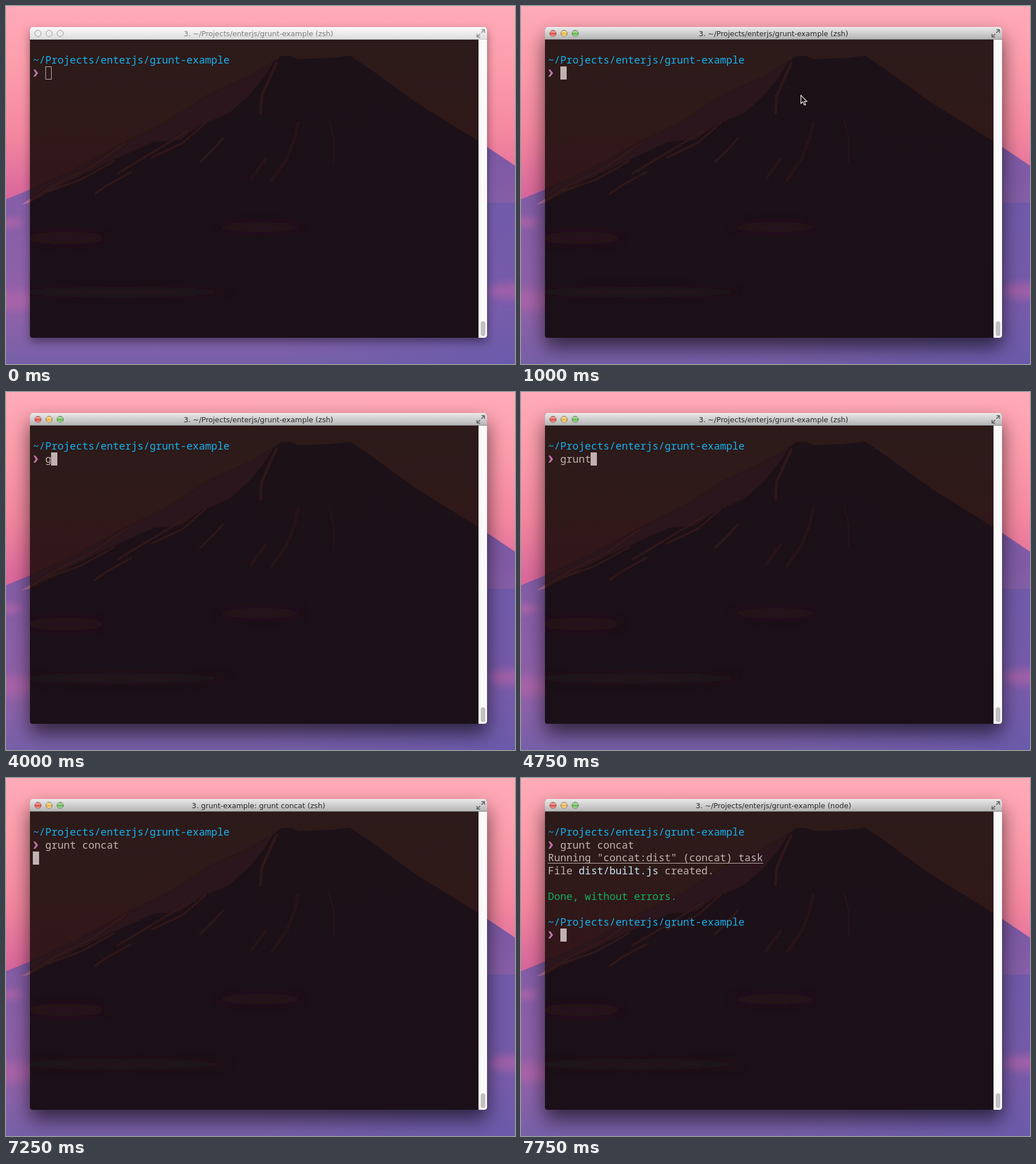
Animation, 892 px wide and 628 px high, one loop 8000 ms. Source, as an HTML page:

```html
<!DOCTYPE html>
<html lang="en">
<head>
<meta charset="utf-8">
<title>Terminal</title>
<style>
html, body { margin: 0; width: 100%; height: 100%; overflow: hidden; }
svg { display: block; width: 892px; height: 628px; }
.mono { font: 17.95px "Noto Sans Mono", monospace; fill: #c1b3b0; white-space: pre; }
#title { font: 12.68px "DejaVu Sans", sans-serif; text-anchor: middle; }
.path { fill: #14b2ee; }
.file { fill: #caeaf5; }
.ok { fill: #13ad5c; }
</style>
</head>
<body>
<svg viewBox="0 0 892 628">
  <defs>
    <linearGradient id="sky" x2="0" y2="1">
      <stop stop-color="#ffabb8"/><stop offset=".3" stop-color="#fd9dac"/>
      <stop offset=".65" stop-color="#f4879f"/><stop offset="1" stop-color="#d7649c"/>
    </linearGradient>
    <linearGradient id="hill" gradientUnits="userSpaceOnUse" x1="0" y1="240" x2="0" y2="628">
      <stop stop-color="#7b58a4"/><stop offset=".3" stop-color="#865fa7"/>
      <stop offset=".6" stop-color="#8d60a7"/><stop offset=".72" stop-color="#9563a9"/>
      <stop offset="1" stop-color="#7660a8"/>
    </linearGradient>
    <linearGradient id="blue"><stop offset=".5" stop-color="#5f56ac" stop-opacity="0"/><stop offset="1" stop-color="#5f56ac" stop-opacity=".55"/></linearGradient>
    <linearGradient id="dusk" x2="0" y2="1">
      <stop stop-color="#2c1b1a"/><stop offset=".5" stop-color="#2f1919"/><stop offset="1" stop-color="#33161a"/>
    </linearGradient>
    <linearGradient id="rock" x2="0" y2="1">
      <stop stop-color="#1d1118"/><stop offset="1" stop-color="#1b1018"/>
    </linearGradient>
    <linearGradient id="barOff" x2="0" y2="1"><stop stop-color="#fafafa"/><stop offset="1" stop-color="#dcdcdc"/></linearGradient>
    <linearGradient id="barOn" x2="0" y2="1"><stop stop-color="#e9e9e9"/><stop offset="1" stop-color="#b3b3b3"/></linearGradient>
    <linearGradient id="gloss" x2="0" y2="1"><stop stop-color="#fff" stop-opacity=".1"/><stop offset=".25" stop-color="#fff" stop-opacity=".55"/><stop offset=".5" stop-color="#fff" stop-opacity="0"/><stop offset="1" stop-color="#fff" stop-opacity=".5"/></linearGradient>
    <filter id="soft" x="-50%" y="-150%" width="200%" height="400%"><feGaussianBlur stdDeviation="7"/></filter>
    <filter id="fuzz"><feGaussianBlur stdDeviation="1.2"/></filter>
    <clipPath id="frame"><rect x="42" y="37" width="801" height="545" rx="4.5"/></clipPath>
  </defs>

  <!-- wallpaper -->
  <rect width="892" height="345" fill="url(#sky)"/>
  <path d="M0 339 42 322 470 96H603L828 237 892 280V628H0Z" fill="url(#hill)"/>
  <rect y="345" width="892" height="283" fill="url(#blue)"/>
  <path d="M28 348 42 338V345Z" fill="#c27aa9"/>
  <g filter="url(#soft)" fill="#b965a8">
    <ellipse cx="6" cy="380" rx="22" ry="6"/>
    <ellipse cx="8" cy="516" rx="45" ry="18" opacity=".5"/>
    <ellipse cx="884" cy="500" rx="38" ry="14" opacity=".6"/>
  </g>

  <!-- window -->
  <rect id="shadow" x="42" y="37" width="801" height="545" rx="4.5" fill="#1c1118"/>
  <g clip-path="url(#frame)">
    <rect x="42" y="59" width="786" height="270" fill="url(#dusk)"/>
    <path d="M42 322 120 287 200 243 285 201 360 153 425 124 470 97 482 88 498 87 512 93 570 91 603 87 640 112 720 170 828 237V582H42Z" fill="url(#rock)"/>
    <path d="M42 322 120 287 200 243 285 201 360 153 425 124 470 97 452 125 425 158 392 187 340 210 305 235 260 238 200 265 120 303 42 345Z" fill="#2b171a" filter="url(#fuzz)"/>
    <g fill="none" stroke="#361b1c" stroke-linecap="round" filter="url(#fuzz)">
      <path stroke-width="3" d="M42 342 85 314 150 282 210 240M75 325 130 305 190 272M155 330 178 314 220 291M195 294 265 252 320 218M255 266 310 240 350 205M340 274 368 246 380 232"/>
      <path stroke-width="5" d="M474 100 461 128 448 158 446 188" opacity=".75"/>
      <path stroke-width="6" d="M512 205 506 232 492 268 466 305M430 302 455 268" opacity=".45"/>
      <path stroke-width="2" d="M566 200 575 235 574 275" opacity=".6"/>
    </g>
    <g filter="url(#soft)" fill="#2c151b">
      <ellipse cx="105" cy="407" rx="70" ry="11" opacity=".75"/>
      <ellipse cx="445" cy="388" rx="75" ry="9" opacity=".6"/>
      <ellipse cx="200" cy="502" rx="190" ry="10" opacity=".3"/>
    </g>
    <rect x="828" y="59" width="15" height="523" fill="#fafafa"/>
    <path d="M828.5 59V582" stroke="#ebe8e8"/>
    <rect x="832" y="553" width="8" height="26" rx="4" fill="#c1c1c1"/>
    <rect id="bar" x="42" y="37" width="801" height="22"/>
    <path id="edge" d="M42 58.5H843"/>
    <path d="M44 37.5H841" stroke="#fff" opacity=".6"/>
  </g>
  <g id="lights"></g>
  <path id="full" d="M833 41.5H838.5V47M838 42 833 47M831 54.5H825.5V49M826 54 831 49" fill="none" stroke-width="1.7"/>
  <text id="title" x="442.5" y="53"></text>
  <g id="screen"></g>
  <rect id="caret"/>
  <path id="mouse" d="M0 0V14.5L3.3 11.5 5.8 17H8.3L6 11H10.6Z" fill="#111" stroke="#fff" stroke-width="1.1"/>
</svg>
<script>
const $ = id => document.getElementById(id);
const LOOP = 8000, COL = 10.77, LINE = 22.5, LEFT = 47.3, TOP = 83.5;
const CWD = '~/Projects/enterjs/grunt-example', CMD = 'grunt concat';

// [start time, value] lists, each value holding until the next
const typed = [[0, 0], [4000, 1], [4250, 2], [4500, 4], [4750, 5], [6000, 6], [6250, 9], [6500, 11], [6750, 12]];
const titles = [[0, CWD + ' (zsh)'], [7250, 'grunt-example: ' + CMD + ' (zsh)'], [7500, CWD + ' (zsh)'], [7750, CWD + ' (node)']];
const mouse = [[0, null], [500, [868, 50]], [750, [537.5, 141.5]], [1000, [490.5, 156.5]], [2250, [492.5, 156.5]], [2500, null]];
const at = (list, t) => list.findLast(([start]) => start <= t)[1];

const set = (id, attrs) => { for (const k in attrs) $(id).setAttribute(k, attrs[k]); };
const span = (cls, s) => `<tspan class="${cls}">${s}</tspan>`;
const line = (row, html, col = 0) =>
  `<text class="mono" x="${LEFT + col * COL}" y="${TOP + row * LINE + 17.8}">${html}</text>`;
const prompt = (row, input) => line(row, span('path', CWD)) +
  `<path d="M48 ${TOP + (row + 1) * LINE + 5.5}h3.4l4.8 6.3-4.8 6.3H48l4-6.3Z" fill="#bd75a6"/>` +
  line(row + 1, input, 2);
const output = line(2, 'Running "concat:dist" (concat) task') +
  `<path d="M47 149.5H424.5" stroke="#c1b3b0"/>` +
  line(3, `File ${span('file', 'dist/built.js')} created.`) +
  line(5, span('ok', 'Done, without errors.')) + prompt(7, '');

function drawChrome(active) {
  const colors = active ? ['#e8473f', '#e9b341', '#5fba4b'] : Array(3).fill('#ececec');
  $('lights').innerHTML = colors.map((c, i) => {
    const dot = `cx="${56 + i * 19.5}" cy="48" r="5.5"`;
    return `<circle ${dot} fill="${c}" stroke="${active ? '#0007' : '#999'}"/>` +
      (active ? `<circle ${dot} fill="url(#gloss)"/>` : '');
  }).join('');
  set('bar', { fill: active ? 'url(#barOn)' : 'url(#barOff)' });
  set('edge', { stroke: active ? '#858585' : '#c4c4c4' });
  set('full', { stroke: active ? '#606060' : '#8f8f8f' });
  set('title', { fill: active ? '#262626' : '#7c7c7c' });
  $('shadow').style.filter = active
    ? 'drop-shadow(0 17px 17px rgba(0,0,0,.62))'
    : 'drop-shadow(0 7px 8px rgba(0,0,0,.42))';
}

let last = -1;
function draw(now) {
  requestAnimationFrame(draw);
  const t = Math.floor(now % LOOP / 250) * 250;
  if (t === last) return;
  last = t;
  const active = t >= 1000, n = at(typed, t), pos = at(mouse, t);
  drawChrome(active);
  $('title').textContent = '3. ' + at(titles, t);
  $('screen').innerHTML = prompt(0, CMD.slice(0, n)) + (t >= 7500 ? output : '');

  const [row, col] = t >= 7500 ? [8, 2] : t >= 7250 ? [2, 0] : [1, 2 + n];
  const x = Math.round(LEFT + col * COL - .3), y = Math.round(TOP + row * LINE);
  set('caret', active
    ? { x, y, width: 11, height: 23, fill: '#c1b2b1', stroke: 'none' }
    : { x: x + .5, y: y + .5, width: 10, height: 22, fill: 'none', stroke: '#c1b2b1' });
  $('mouse').style.display = pos ? '' : 'none';
  if (pos) set('mouse', { transform: `translate(${pos})` });
}
requestAnimationFrame(draw);
</script>
</body>
</html>
```
